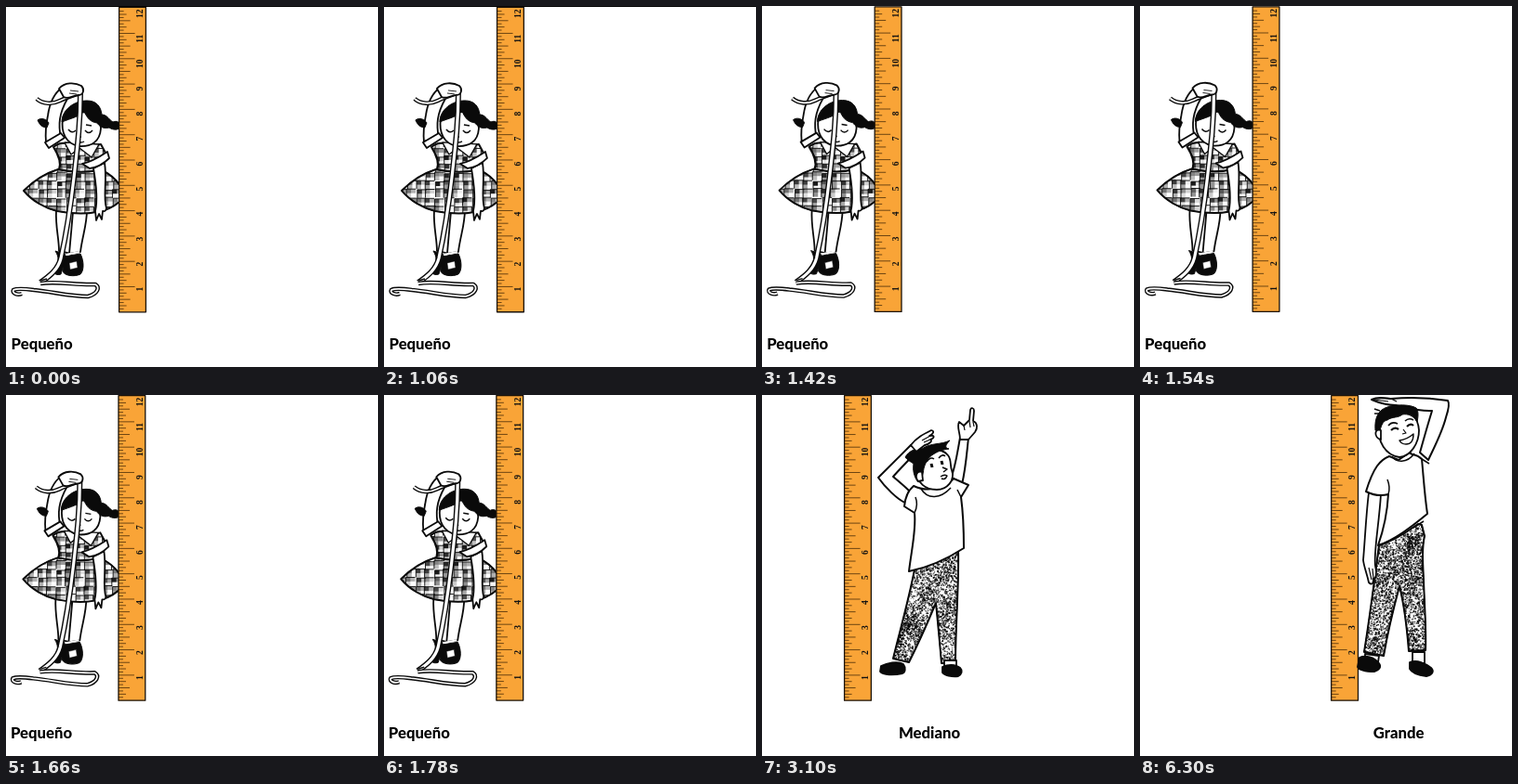
These frames come from a looping animation (400 by 389 pixels, 8 s). An HTML page with a canvas:

```html
<!DOCTYPE html>
<html lang="es">
<head>
<meta charset="utf-8">
<style>
html, body { margin: 0; width: 100%; height: 100%; overflow: hidden; background: #fff; }
canvas { display: block; }
</style>
</head>
<body>
<canvas id="stage" width="400" height="389"></canvas>
<script>
const ctx = document.getElementById('stage').getContext('2d');
const LOOP = 8000, INK = '#0a0a0a';

function shape(d, fill = '#fff', width = 1.8) {
  const p = new Path2D(d);
  ctx.fillStyle = fill;
  ctx.fill(p);
  ctx.lineWidth = width;
  ctx.strokeStyle = INK;
  ctx.stroke(p);
}

function line(d, width = 1.5, color = INK) {
  ctx.lineWidth = width;
  ctx.strokeStyle = color;
  ctx.stroke(new Path2D(d));
}

function tape(d, width) {
  line(d, width + 2.8);
  line(d, width, '#fff');
}

function textured(d, paint) {
  shape(d, '#fff', 1);
  ctx.save();
  ctx.clip(new Path2D(d));
  paint();
  ctx.restore();
  line(d, 2);
}

function random(seed) {
  return () => (seed = (seed * 16807) % 2147483647) / 2147483647;
}

// loosely woven checks with uneven ink
function plaid() {
  const rnd = random(23);
  for (let y = 143; y < 230; y += 9) {
    for (let x = 14; x < 126; x += 10) {
      const jx = x + rnd() * 2, jy = y + rnd() * 2;
      ctx.fillStyle = `rgba(0,0,0,${0.4 + rnd() * 0.5})`;
      ctx.fillRect(jx, jy, 5, 4.5);
      ctx.fillStyle = `rgba(0,0,0,${rnd() * 0.45})`;
      ctx.fillRect(jx + 5, jy, 5, 4.5);
      ctx.fillStyle = `rgba(0,0,0,${rnd() * 0.45})`;
      ctx.fillRect(jx, jy + 4.5, 5, 4.5);
      line(`M${jx} ${jy}v9M${jx} ${jy}h10`, 0.9);
    }
  }
}

function speckle(x, y, w, h, seed, density = 0.5) {
  const rnd = random(seed);
  for (let i = 0; i < w * h * density; i++) {
    const px = x + rnd() * w, py = y + rnd() * h, s = 0.9 + rnd() * 0.9;
    const patch = 0.72 + 0.28 * Math.sin(px / 6) * Math.sin(py / 9);
    ctx.fillStyle = `rgba(0,0,0,${0.45 + rnd() * 0.5})`;
    if (rnd() < patch) ctx.fillRect(px, py, s, s);
  }
}

function ruler(x, y) {
  const inch = 27.3, bottom = y + 328.5;
  ctx.fillStyle = '#f9a437';
  ctx.fillRect(x, y, 28.8, 328.5);
  for (let i = 1; i < 96; i++) {
    const len = i % 8 === 0 ? 17 : i % 4 === 0 ? 12 : i % 2 === 0 ? 8 : 5;
    line(`M${x} ${bottom - i * inch / 8}h${len}`, 0.8, '#4a2c08');
  }
  ctx.lineWidth = 1.3;
  ctx.strokeStyle = '#1a1208';
  ctx.strokeRect(x, y, 28.8, 328.5);
  ctx.font = 'bold 9.5px "Liberation Serif", serif';
  ctx.fillStyle = '#111';
  ctx.textAlign = 'center';
  for (let n = 1; n <= 12; n++) {
    ctx.save();
    ctx.translate(x + 25.7, bottom - n * 27 + 2.4);
    ctx.rotate(-Math.PI / 2);
    ctx.fillText(n, 0, 0);
    ctx.restore();
  }
}

function label(text, x, y) {
  ctx.font = '800 16.7px Lato, "Open Sans", sans-serif';
  ctx.textAlign = 'left';
  ctx.fillStyle = '#000';
  ctx.fillText(text, x, y);
}

function girl() {
  // legs and shoes
  shape('M54 220C53 238 57 250 57 264L70 267L72 222Z');
  shape('M72 222L68 267L80 265C82 248 87 236 87 220Z');
  shape('M53 264C57 270 57 276 53 281C49 287 53 291 59 289L65 268Z', INK, 1);
  shape('M62 270L80 267C84 275 84 285 80 289C74 292 63 291 61 286Z', INK, 1);
  shape('M68 277L76 275L77 282L69 284Z', '#fff', 0.5);
  line('M64 268L79 265', 2, '#fff');
  // dress
  textured('M19 199C30 188 43 180 56 176C72 179 88 179 101 176C110 180 118 186 123 194L122 211C115 217 106 221 97 222C82 225 66 223 55 221C42 218 28 210 19 199Z', plaid);
  textured('M51 152C60 145 66 148 72 152C85 156 95 150 102 149L108 160C104 166 100 168 98 177C84 180 70 179 57 176C60 168 56 160 51 152Z', plaid);
  shape('M63 147L70 160L79 153L92 163L100 149Z', '#fff', 1.3);
  // lowered arm
  shape('M94 175L106 169C109 188 104 205 108 218C107 222 106 221 104 221L103 230L100 224L97 231L96 221C99 208 97 192 94 175Z');
  shape('M82 170C92 168 100 163 109 157L111 164C105 170 98 174 90 175Z');
  // raised arm
  shape('M60 88C52 94 47 104 45 118C43 128 42 136 43 146L59 142C56 128 57 116 66 100Z');
  shape('M42 147L59 137L63 142L46 153Z');
  // head
  shape('M34 123C38 120 44 122 46 126L44 131C39 131 36 128 34 123Z', INK, 1);
  shape('M61 122C59 136 64 148 78 151C92 152 101 146 102 132C103 118 84 106 61 122Z');
  shape('M60 125C60 112 73 102 87 102C97 102 102 108 103 117C109 117 112 124 115 125C120 123 123 126 123 130C122 134 115 134 111 131C104 133 100 129 98 126C91 125 87 121 84 113C80 119 70 121 60 125Z', INK, 1);
  line('M67 133Q71 138 75 134M85 134Q89 139 93 134M86 128L92 129M79 141L81 141M77 146Q81 148 84 146');
  // hand and tape
  tape('M33 100C40 106 50 106 58 102C64 99 70 97 79 94', 1.8);
  tape('M80 93C80 125 77 150 73 185C69 220 65 245 59 272C56 284 47 291 37 298', 3.2);
  shape('M57 89C63 82 74 82 81 86C85 90 83 96 78 96C72 96 67 101 62 98Z');
  line('M69 91L78 92M68 94L76 95', 0.9);
  tape('M37 299C55 296 75 301 96 300C101 303 99 310 88 313C70 313 50 308 30 306C22 305 12 304 8 306C6 309 12 312 17 310', 1.7);
  line('M37 296L44 294');
}

function boyPointing() {
  shape('M203 90C208 78 210 62 213 46L222 46C220 64 219 80 215 96Z', '#fff', 2);
  shape('M213 48C213 40 209 34 212 29L217 33L223 27L224 16C225 13 228 14 228 17L227 28C232 30 232 36 229 40L222 48Z');
  line('M217 33L218 38M223 28L224 35M227 29L228 34', 1.2);
  textured('M164 188C180 184 198 176 211 168C212 200 208 250 208 288L193 289C191 265 189 245 187 224C177 248 168 268 158 288L141 284C148 255 158 220 164 188Z', () => {
    speckle(140, 166, 74, 125, 71, 0.58);
    speckle(144, 245, 26, 24, 9);
  });
  shape('M196 286L209 286L209 292L196 292Z');
  shape('M128 292C134 289 146 286 152 290C155 294 154 299 151 300C142 302 130 302 127 298Z', INK);
  shape('M194 293C200 290 208 290 213 294C216 297 215 301 211 303C204 304 196 302 194 299Z', INK);
  shape('M154 116C146 113 132 99 125 89C134 80 148 66 160 54L167 60C158 70 148 80 141 88C147 93 153 98 158 103Z', '#fff', 2);
  shape('M163 98C157 103 154 110 153 120L164 127C166 145 161 165 158 190C178 186 200 176 217 165C217 145 216 125 214 110L222 97L206 90C195 103 175 104 163 98Z', '#fff', 2);
  line('M164 127C167 121 167 115 165 110M214 110L210 102M171 101C178 113 192 112 203 100');
  shape('M167 82C166 95 176 102 188 102C199 102 208 92 204 81C202 76 204 70 200 65C196 60 191 59 186 59C174 61 167 70 167 82Z');
  shape('M154 67C158 60 166 57 172 58C182 51 192 54 202 49C197 54 196 57 201 58C195 59 190 60 184 64C179 67 176 72 174 79C173 86 172 92 168 94C163 88 162 80 163 74C160 72 156 70 154 67Z', INK, 1);
  shape('M172 83C166 81 164 88 168 93L173 92Z');
  line('M177 72Q181 66 185 69M190 68Q194 63 197 66M194 78L199 80L195 83');
  line('M182 74L183 78M193 71L194 75', 3);
  line('M192 88Q196 85 199 87Q197 92 193 90');
  shape('M160 54C166 46 174 42 182 38C186 39 184 42 180 44C186 43 186 46 181 48C184 49 180 53 175 54L166 61Z');
  line('M181 44L172 49M181 48L174 51', 1.2);
}

function boySaluting() {
  shape('M249 5C255 2 262 3 270 4C290 2 312 3 331 6C333 9 331 18 329 24C325 40 317 55 310 70L301 62C306 44 310 30 314 17C300 18 285 13 275 11C265 11 256 8 249 5Z', '#fff', 2);
  line('M252 5L267 7M270 4L276 7', 1.2);
  textured('M257 162C273 157 288 147 299 139L303 140L306 152C303 165 304 180 305 200C306 230 308 255 307 275L289 276C287 250 284 226 279 206C272 232 266 258 262 281L241 277C247 240 252 200 257 162Z', () => {
    speckle(240, 138, 70, 144, 37, 0.6);
    speckle(283, 150, 24, 55, 5, 0.3);
  });
  shape('M242 279L257 281L256 288L242 287Z');
  shape('M293 277L306 277L306 289L293 289Z');
  shape('M236 283C242 280 252 282 257 289C260 293 257 297 252 298C244 298 236 297 234 293Z', INK);
  shape('M290 288C298 285 307 289 313 294C317 298 314 302 308 303C300 302 292 299 290 295Z', INK);
  shape('M246 105C243 130 242 155 240 178C241 186 244 192 246 202C249 205 251 204 251 198C254 198 255 192 253 184C251 170 257 140 259 107Z');
  line('M246 186L249 199M250 187L251 198', 1.2);
  shape('M268 66C258 70 251 78 243 104C251 108 260 109 267 107C266 125 262 145 256 162C274 156 292 142 309 128C306 108 305 90 303 69C296 62 292 66 290 62L278 70Z', '#fff', 2);
  line('M267 107C269 101 268 96 266 91M303 69L311 74M271 66C275 73 287 74 295 63M294 143L305 136');
  shape('M257 34C255 50 264 65 279 67C291 66 300 52 300 38C299 24 290 14 276 15C264 17 257 25 257 34Z');
  shape('M253 38C252 25 256 16 266 13C276 10 290 10 297 14C300 18 299 24 298 29C294 22 288 20 282 21C278 25 271 23 266 27C261 28 260 32 258 38Z', INK, 1);
  line('M258 17L252 15M257 20L252 20');
  shape('M259 38C252 35 251 46 259 48Z');
  line('M267 33Q271 28 277 31M285 28Q289 24 294 27');
  line('M270 38Q274 34 278 37M287 34Q291 30 294 33', 2.2);
  line('M283 37L286 41L282 42', 1.2);
  shape('M279 49Q287 48 294 42Q294 53 286 53Q281 53 279 49Z', '#fff', 1.4);
}

function draw(t) {
  ctx.setTransform(1, 0, 0, 1, 0, 0);
  ctx.fillStyle = '#fff';
  ctx.fillRect(0, 0, 400, 389);
  ctx.lineJoin = 'round';
  ctx.lineCap = 'butt';
  if (t < 3100) {
    const step = Math.max(0, Math.min(14, Math.floor((t - 1060) / 60) + 1));
    const shift = step / 14;
    if (step < 6) {
      ctx.fillStyle = '#000';
      ctx.fillRect(0, 0, 400, 1);
    }
    ctx.translate(-shift * 0.8, -shift * 0.8);
    girl();
    ruler(121.6, 1.3);
    label('Pequeño', 5.6, 370.3);
  } else if (t < 6300) {
    ruler(88.6, 0.7);
    boyPointing();
    label('Mediano', 147, 369.7);
  } else {
    ruler(205.7, 0.7);
    boySaluting();
    label('Grande', 250.8, 369.7);
  }
}

const start = performance.now();
function tick() {
  draw((performance.now() - start) % LOOP);
  requestAnimationFrame(tick);
}
tick();
</script>
</body>
</html>
```
